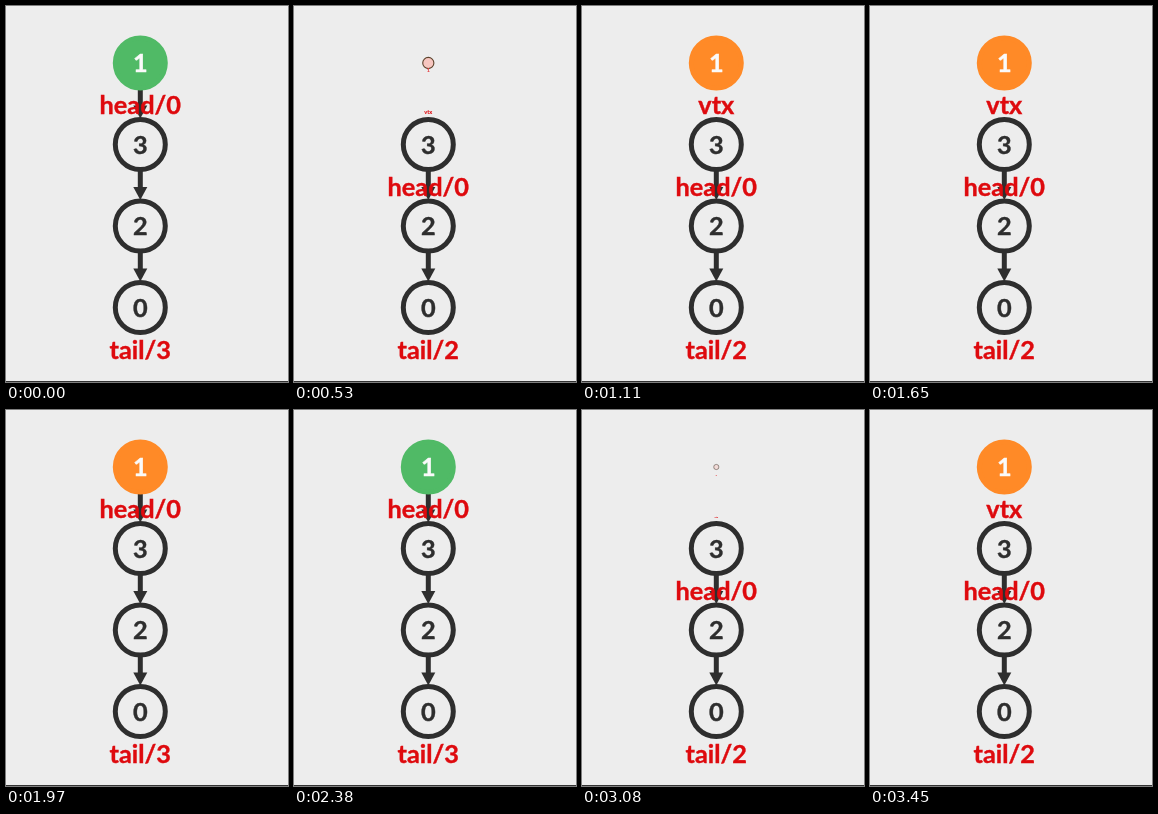
An HTML page with a canvas that plays this animation: 282 px wide and 376 px high, repeating every 3550 ms.

```html
<!DOCTYPE html>
<html lang="en">
<head>
<meta charset="utf-8">
<title>Linked list: insert at head</title>
<style>
html, body { margin: 0; width: 100%; height: 100%; overflow: hidden; background: #ededed; }
canvas { display: block; width: 282px; height: 376px; }
</style>
</head>
<body>
<canvas id="stage" width="282" height="376"></canvas>
<script>
const ctx = document.getElementById('stage').getContext('2d');

const LOOP = 3550;
const X = 134.3;
const TOP = 57;
const GAP = 81.5;
const RADIUS = 25;
const LINE = 5;
const FONT = 'Lato, "Open Sans", sans-serif';

const PAPER = [237, 237, 237];
const PINK = [247, 198, 193];
const ORANGE = [255, 138, 39];
const GREEN = [80, 186, 102];
const INK = [46, 46, 46];
const RED = [222, 10, 14];
const WHITE = [250, 250, 250];

const clamp = v => Math.min(1, Math.max(0, v));
const easeInOut = p => p < 0.5 ? 4 * p ** 3 : 1 - 4 * (1 - p) ** 3;
const progress = (t, start, length) => easeInOut(clamp((t - start) / length));
const mix = (a, b, p) => a.map((v, i) => v + (b[i] - v) * p);
const css = c => `rgb(${c.map(Math.round).join(',')})`;
const rowY = row => TOP + row * GAP;

function text(value, y, color, scale = 1) {
  if (scale < 0.03) return;
  ctx.font = `bold ${25.3 * scale}px ${FONT}`;
  ctx.textAlign = 'center';
  ctx.textBaseline = 'alphabetic';
  ctx.fillStyle = ctx.strokeStyle = css(color);
  ctx.lineWidth = 0.4 * scale;
  ctx.fillText(value, X, y);
  ctx.strokeText(value, X, y);
}

function label(value, row, scale) {
  text(value, rowY(row) + 51.2, RED, scale);
}

function vertex(value, row, fill, stroke, ink, scale = 1) {
  if (scale <= 0) return;
  ctx.beginPath();
  ctx.arc(X, rowY(row), RADIUS * scale, 0, Math.PI * 2);
  ctx.fillStyle = css(fill);
  ctx.fill();
  ctx.strokeStyle = css(stroke);
  ctx.lineWidth = LINE * scale;
  ctx.stroke();
  text(value, rowY(row) + 9, ink, scale);
}

// Arrow from one vertex centre to the rim of the next.
function edge(row, grown = 1) {
  if (grown <= 0) return;
  const start = rowY(row);
  const tip = start + (GAP - RADIUS - 1) * grown;
  ctx.strokeStyle = ctx.fillStyle = css(INK);
  ctx.lineWidth = LINE;
  ctx.beginPath();
  ctx.moveTo(X, start);
  ctx.lineTo(X, Math.max(start, tip - 8));
  ctx.stroke();
  ctx.beginPath();
  ctx.moveTo(X - 7, tip - 13);
  ctx.lineTo(X + 7, tip - 13);
  ctx.lineTo(X, tip);
  ctx.fill();
}

function stateAt(t) {
  if (t < 130) return { grow: 1, link: 1, done: 1, inserted: true };
  if (t < 2500) {
    return {
      grow: progress(t, 340, 500),
      link: progress(t, 1465, 460),
      done: progress(t, 1940, 400),
      inserted: t >= 1970
    };
  }
  return { grow: progress(t, 2930, 510), link: 0, done: 0, inserted: false };
}

function newVertexFill(grow, done) {
  const young = 0.22;
  const base = grow < young
    ? mix(PAPER, PINK, grow / young)
    : mix(PINK, ORANGE, (grow - young) / (1 - young));
  return mix(base, GREEN, done);
}

function draw(t) {
  const { grow, link, done, inserted } = stateAt(t);

  ctx.fillStyle = css(PAPER);
  ctx.fillRect(0, 0, 282, 376);
  ctx.fillStyle = '#333';
  ctx.fillRect(0, 375, 282, 1);

  edge(0, link);
  edge(1);
  edge(2);

  const rim = mix(mix(INK, ORANGE, grow), GREEN, done);
  vertex('1', 0, newVertexFill(grow, done), rim, mix(RED, WHITE, grow), grow);
  ['3', '2', '0'].forEach((value, i) => vertex(value, i + 1, PAPER, INK, INK));

  if (inserted) {
    label('head/0', 0);
    label('tail/3', 3);
  } else {
    label('vtx', 0, grow);
    label('head/0', 1);
    label('tail/2', 3);
  }
}

function tick() {
  draw(performance.now() % LOOP);
  requestAnimationFrame(tick);
}
tick();
</script>
</body>
</html>
```
